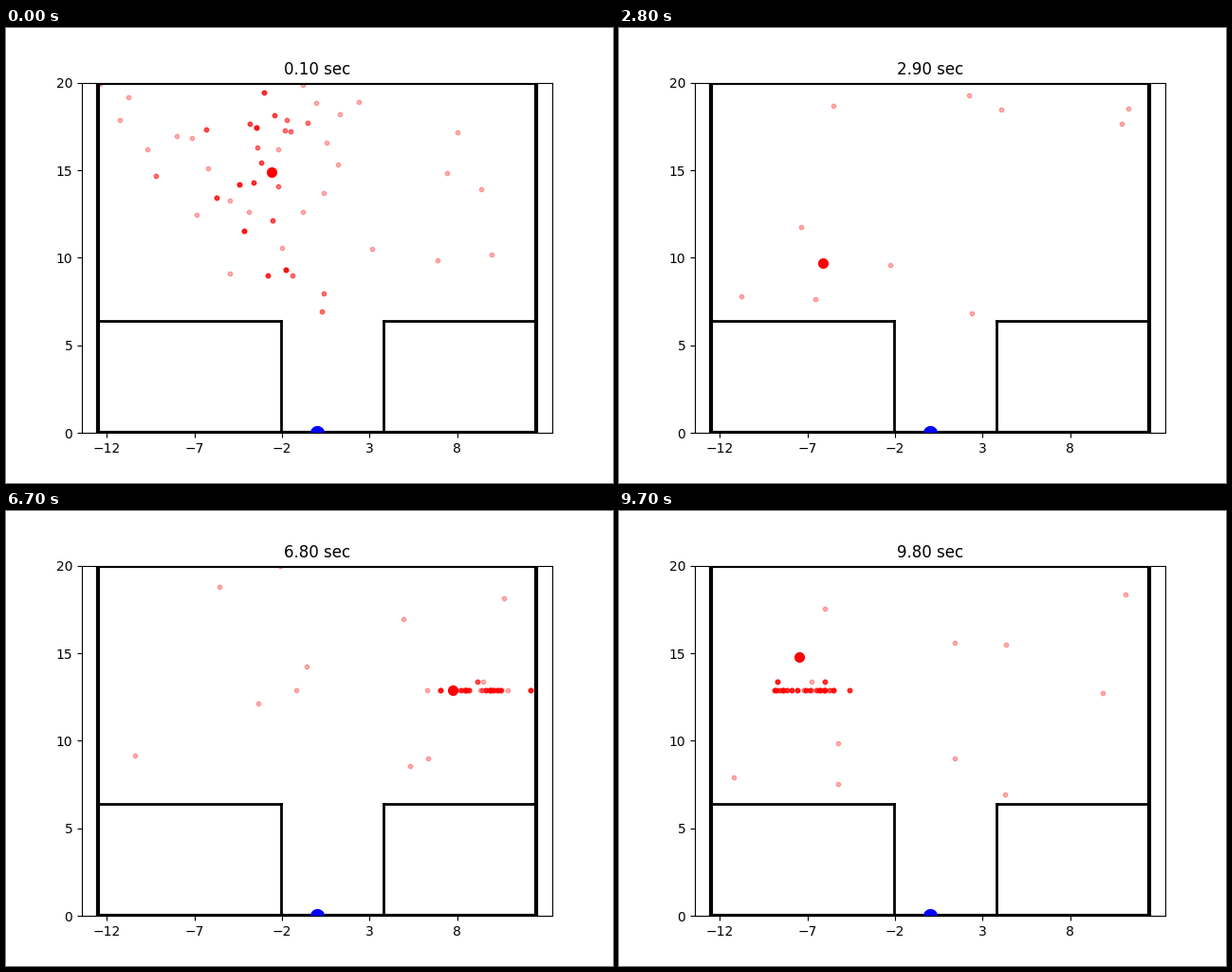
Recreate the animation shown at these times as a matplotlib script. Size 640 px wide and 480 px high, loop 9800 ms.

```python
import numpy as np
import matplotlib.pyplot as plt
from matplotlib.animation import FuncAnimation

FRAMES, STEP = 98, 100
HALF_W, TOP, SHELF = 12.5, 20, 6.4
STRAYS, COPIES, ORIGINS = 10, 90, 28
VIEW = 13.42
rng = np.random.default_rng(7)

# The estimate holds one depth, then jumps; its bearing drifts smoothly.
JUMPS = [0, 9, 17, 28, 36, 44, 52, 97]
DEPTHS = [14.87, 8.78, 11.5, 9.7, 14.2, 10.8, 12.89, 14.76]
BEARING_AT = [0, 9, 28, 52, 67, 86, 97]
BEARING_TAN = [-0.175, -0.117, -0.629, 0.923, 0.600, -0.176, -0.505]

# The cloud's centre, and the depths its particles keep early and late.
CLOUD_AT = [0, 9, 52, 67, 86, 97]
CLOUD_X = [-3.0, -2.7, 11.9, 9.2, -2.9, -7.2]
EARLY_ROWS = [15.54, 15.54, 14.87, 12.24, 15.87]
LATE_ROWS = [12.89, 12.89, 12.89, 12.89, 13.38]


def estimate_at(k):
    depth = DEPTHS[np.searchsorted(JUMPS, k, side="right") - 1]
    return depth * np.interp(k, BEARING_AT, BEARING_TAN), depth


def scatter_room(n):
    return np.column_stack([rng.uniform(-HALF_W, HALF_W, n),
                            rng.uniform(SHELF, TOP, n)])


def resample(points, weights=None):
    return points[rng.choice(len(points), COPIES, p=weights)]


def opening_fan():
    """Particles kept because they lie near the first bearing."""
    points = scatter_room(150)
    angle = np.arctan2(-points[:, 0], points[:, 1])
    weights = np.exp(-0.5 * ((angle - 0.24) / 0.14) ** 2)
    return resample(points, weights / weights.sum())


def cloud(k):
    """Copies of a few particles, spread only sideways along their rows."""
    if k == 0:
        return opening_fan()
    if 9 < k <= 52:                # all copies share the estimate's place
        return np.tile(estimate_at(k), (COPIES, 1))
    x = rng.normal(np.interp(k, CLOUD_AT, CLOUD_X), 1.15, ORIGINS)
    y = rng.choice(EARLY_ROWS if k <= 9 else LATE_ROWS, ORIGINS)
    return resample(np.column_stack([x.clip(-HALF_W, HALF_W), y]))


steps = [np.vstack([scatter_room(STRAYS), cloud(k)]) for k in range(FRAMES)]

fig, ax = plt.subplots(figsize=(6.4, 4.8), dpi=100)
ax.set_xlim(-VIEW, VIEW)
ax.set_ylim(0, TOP)
ax.set_xticks(range(-12, 13, 5))
ax.set_yticks(range(0, 21, 5))

for side in (-HALF_W, HALF_W):
    ax.plot([side, side], [0, TOP], "k", lw=3)
for level in (0, TOP):
    ax.plot([-HALF_W, HALF_W], [level, level], "k", lw=3)
for edge, wall in ((-2.03, -HALF_W), (3.8, HALF_W)):
    ax.plot([wall, edge], [SHELF, SHELF], "k", lw=2)
    ax.plot([edge, edge], [0, SHELF], "k", lw=2)

ax.plot([0], [0], "bo", ms=10)
particles = ax.scatter([], [], s=10, c="r", alpha=0.3)
estimate, = ax.plot([], [], "ro", ms=7)
title = ax.set_title("")


def update(k):
    x, y = estimate_at(k)
    particles.set_offsets(steps[k])
    estimate.set_data([x], [y])
    title.set_text(f"{(k + 1) / 10:.2f} sec")
    return particles, estimate, title


anim = FuncAnimation(fig, update, frames=FRAMES, interval=STEP, repeat=True,
                     repeat_delay=0, blit=False)
plt.show()
```
